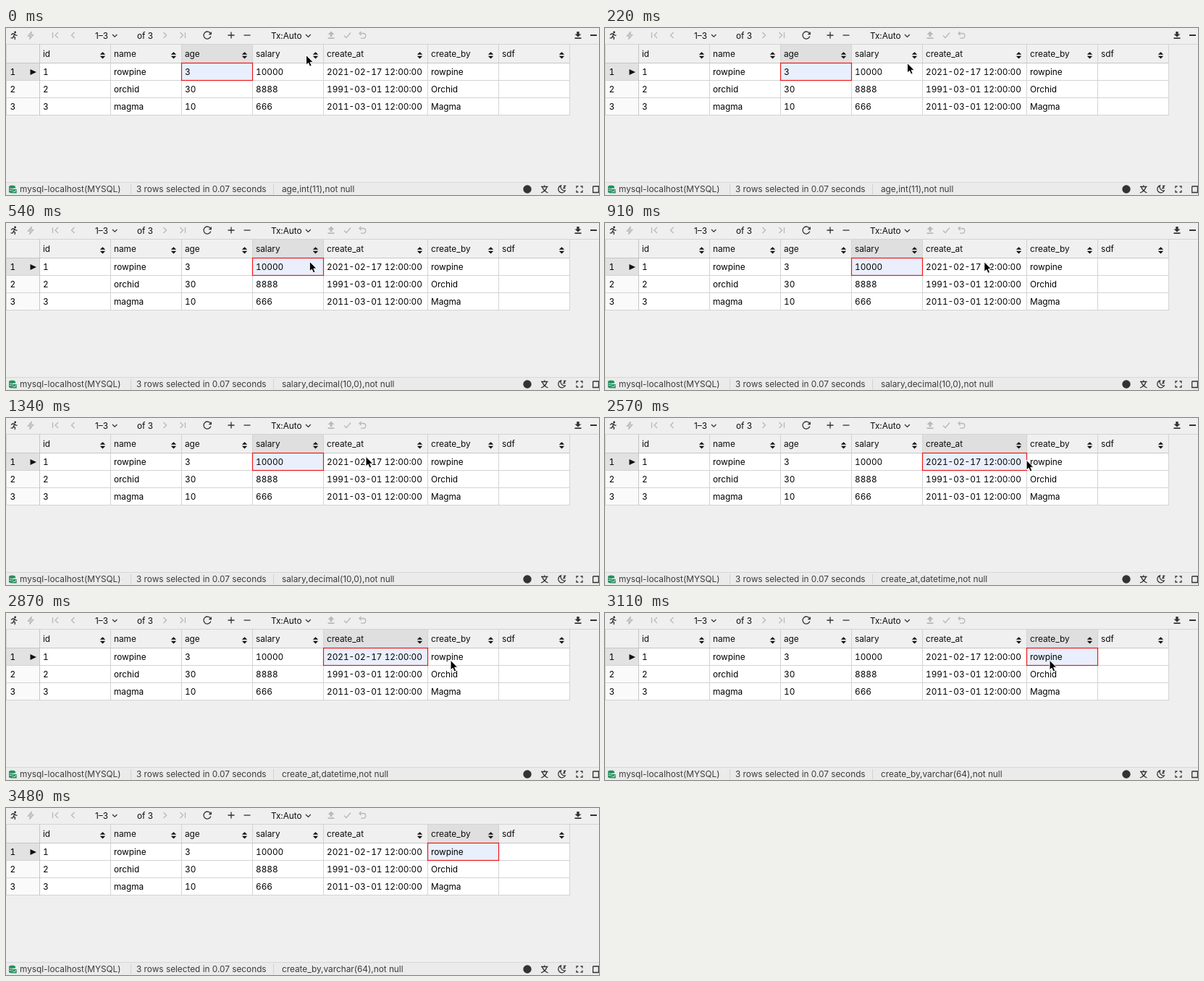
Write an HTML page that moves like this. It is 819 px wide and 231 px high and loops after 4.05 s.

```html
<!DOCTYPE html>
<html lang="en">
<head>
<meta charset="utf-8">
<title>Result grid</title>
<style>
html, body { margin: 0; width: 100%; height: 100%; overflow: hidden; background: #efefef; }
svg { display: block; width: 819px; height: 231px; }
text { font: 11.8px Inter, "Liberation Sans", sans-serif; fill: #0c0c0c; white-space: pre; }
.cells text { fill: #000; font-variant-numeric: tabular-nums; }
.status text { fill: #3a3a3a; }
.line { fill: none; stroke: #333; stroke-width: 1.3; }
.pale { stroke: #b9b9b9; }
</style>
</head>
<body>
<svg id="stage" viewBox="0 0 819 231" xmlns="http://www.w3.org/2000/svg"></svg>
<script>
const LOOP = 4050;
const stage = document.getElementById('stage');

function add(tag, attrs, parent = stage) {
  const node = document.createElementNS('http://www.w3.org/2000/svg', tag);
  for (const key in attrs) node.setAttribute(key, attrs[key]);
  return parent.appendChild(node);
}
const rect = (x, y, width, height, fill, parent) => add('rect', { x, y, width, height, fill }, parent);
const line = (d, pale, parent) => add('path', { d, class: pale ? 'line pale' : 'line' }, parent);
const solid = (d, fill, parent) => add('path', { d, fill }, parent);
function label(x, y, string, parent) {
  const node = add('text', { x, y }, parent);
  node.textContent = string;
  return node;
}

const edges = [46, 144, 242, 340, 438, 582, 680, 778];
const names = ['id', 'name', 'age', 'salary', 'create_at', 'create_by', 'sdf'];
const rows = [
  ['1', 'rowpine', '3', '10000', '2021-02-17 12:00:00', 'rowpine', ''],
  ['2', 'orchid', '30', '8888', '1991-03-01 12:00:00', 'Orchid', ''],
  ['3', 'magma', '10', '666', '2011-03-01 12:00:00', 'Magma', '']
];
const details = {
  2: 'age,int(11),not null',
  3: 'salary,decimal(10,0),not null',
  4: 'create_at,datetime,not null',
  5: 'create_by,varchar(64),not null'
};

function drawToolbar() {
  // running figure and bolt
  add('circle', { cx: 12.6, cy: 5.8, r: 1.4, fill: '#222' });
  line('M7 9.5L9.3 7.8L12 8.3L10.4 11.6L12.6 13.2L12 16M10.4 11.6L9.2 13.8H6.6M12 8.3L13.4 10.2H15.6');
  line('M35.5 5L30.5 11H34L32.5 15.5L37.7 9.3H34.2Z', true);
  // paging
  line('M64.5 6V14M72 6L68 10L72 14', true);
  line('M94.5 6L90.5 10L94.5 14', true);
  label(123, 14.5, '1–3');
  line('M147 9L150.2 12.2L153.4 9');
  label(181, 14.5, 'of 3');
  line('M217.5 6L221.5 10L217.5 14', true);
  line('M240.5 6L244.5 10L240.5 14M247.5 6V14', true);
  // refresh, add, remove
  line('M282.6 8A5 5 0 1 0 282.8 11.5M283.3 5.5V8.6H280.2');
  line('M306.5 10H315.5M311 5.5V14.5');
  line('M328.5 10H337.5');
  label(366, 14.5, 'Tx:Auto');
  line('M414 9L417.4 12.4L420.8 9');
  solid('M449 4.5L453.5 9H450.5V12H447.5V9H444.5ZM444.5 13.3H453.5V15H444.5Z', '#b9b9b9');
  line('M467 10.5L470 13.5L476 6.5', true);
  line('M490.5 5L488 7.5L490.5 10M488 7.5H493.5A3.3 3.3 0 0 1 493.5 14.2H490', true);
  solid('M788.3 5H791.7V8.5H794.5L790 12.5L785.5 8.5H788.3ZM785.5 13.3H794.5V15H785.5Z', '#333');
  rect(807, 9, 9, 2, '#333');
}

function drawStatus() {
  const bar = add('g', { class: 'status' });
  rect(0, 213, 819, 18, '#ebebeb', bar);
  rect(0, 213, 819, 1, '#d8d8d8', bar);
  solid('M4 219.5C4 217.3 13 217.3 13 219.5V222H9V228.4C6.5 228.5 4 227.8 4 226.7Z', '#23905e', bar);
  line('M4.5 221.5C6 222.7 10 222.7 12.5 221.5M4.5 224.4L8.5 225', false, bar).style.cssText = 'stroke:#ebebeb;stroke-width:.8';
  solid('M9.3 223H14.7V228.5H9.3Z', '#23905e', bar);
  line('M10.3 225.7L11.6 227L13.8 224.3', false, bar).style.cssText = 'stroke:#fff;stroke-width:1';
  label(19, 227, 'mysql-localhost(MYSQL)', bar);
  rect(172, 216, 1, 14, '#d2d2d2', bar);
  label(180, 227, '3 rows selected in 0.07 seconds', bar);
  rect(369, 216, 1, 14, '#d2d2d2', bar);
  add('circle', { cx: 720, cy: 223, r: 5.7, fill: '#333' }, bar);
  line('M739 219.5H748.5M743.7 217.5V219.5M740.5 219.5C742 224 745 226.5 748.5 228M747 219.5C746 224 743 226.5 739 228', false, bar);
  line('M766.5 218A5 5 0 1 0 772.3 225A5.2 5.2 0 0 1 766.5 218ZM770 218.5H772.5L770 221.5H772.5', false, bar);
  line('M788 221.5V219H790.5M793.5 219H796V221.5M796 224.5V227H793.5M790.5 227H788V224.5', false, bar);
  line('M810.7 219H819M810.7 219V227.5H819M818.5 219V227.5', false, bar);
  return label(381, 227, '', bar);
}

drawToolbar();
rect(0, 22, 778, 26, '#f0f0f0');
rect(0, 48, 778, 72, '#fff');
rect(1, 72, 45, 48, '#fafafa');
rect(1, 48, 45, 24, '#e2e2e2');
const headFill = rect(0, 23, 0, 25, '#dfdfdf');
const cellFill = rect(0, 48, 0, 24, '#e9effc');

const grid = '#d3d3d3';
rect(0, 22, 819, 1, grid);
for (const y of [48, 72, 96, 120]) rect(0, y, 778, 1, grid);
for (const x of [0, ...edges]) rect(x, 22, 1, 99, grid);
rect(0, 48, 778, 1, '#c6c6c6');
rect(46, 22, 1, 99, '#c6c6c6');

const cells = add('g', { class: 'cells' });
names.forEach((name, i) => {
  const x = edges[i] + 5, mid = edges[i + 1] - 10.5;
  label(x, 39.5, name);
  solid(`M${mid - 3.7} 36.8L${mid} 33.2L${mid + 3.7} 36.8ZM${mid - 3.7} 38.8L${mid} 42.4L${mid + 3.7} 38.8Z`, '#111');
  rows.forEach((row, r) => label(x, 65 + 24 * r, row[i], cells));
});
rows.forEach((row, r) => label(5.5, 65 + 24 * r, String(r + 1), cells));
solid('M33.5 57L42 61L33.5 65Z', '#111');

const focusBox = add('rect', { y: 48.5, height: 24, fill: 'none', stroke: '#2f80e8' });
const pickBox = add('rect', { y: 48.5, height: 24, fill: 'none', stroke: '#f01818', 'stroke-width': 1.2 });
const info = drawStatus();
const pointer = add('path', {
  d: 'M0 0V13.6L3.1 10.9L5.2 15.7L7.7 14.6L5.6 9.9H9.8Z',
  fill: '#000', stroke: '#fff', 'stroke-width': 1, 'stroke-linejoin': 'round'
});

// time, x, y of the pointer tip
const path = [
  [0, 414.5, 37.5], [30, 414.5, 37.5], [180, 417, 47], [360, 419.3, 53.2], [590, 419.3, 53.2],
  [690, 490, 55], [790, 548, 55], [930, 520, 53.5], [1080, 500, 52.5], [1140, 499, 52.5],
  [1290, 498, 53], [1340, 497, 53.3], [1730, 497, 54], [1840, 497, 57], [2440, 497, 57],
  [2500, 537, 57], [2570, 582, 58.3], [2630, 588, 59], [2750, 606, 63], [2870, 614, 65.3], [3400, 614, 65.3]
];
const exit = [[3410, 600, 86], [3434, 662, 145], [3457, 741, 196]];

// the pressed cell gets the fill first; frame, heading and status follow
const focusAt = [[0, 2], [430, 3], [2080, 4], [2990, 5]];
const pickAt = [[0, 2], [540, 3], [2170, 4], [3110, 5]];
const current = (list, t) => list.filter(item => item[0] <= t).pop();

function tip(t) {
  if (t >= exit[0][0]) return current(exit, t).slice(1);
  const next = path.findIndex(p => p[0] > t);
  if (next < 0) return path[path.length - 1].slice(1);
  const a = path[next - 1], b = path[next];
  const k = (t - a[0]) / (b[0] - a[0]);
  return [1, 2].map(i => a[i] + (b[i] - a[i]) * k);
}

function place(node, column, left, trim) {
  node.setAttribute('x', edges[column] + left);
  node.setAttribute('width', edges[column + 1] - edges[column] - trim);
}

function draw(t) {
  const focus = current(focusAt, t)[1], pick = current(pickAt, t)[1];
  place(headFill, pick, 1, 1);
  place(cellFill, focus, 1, 1);
  place(focusBox, focus, 0.5, 1);
  place(pickBox, pick, 0.5, 0);
  focusBox.style.display = focus === pick ? 'none' : '';
  info.textContent = details[pick];
  pointer.style.display = t < 3480 ? '' : 'none';
  pointer.setAttribute('transform', `translate(${tip(t)})`);
}

const start = performance.now();
function tick() {
  draw((performance.now() - start) % LOOP);
  requestAnimationFrame(tick);
}
draw(0);
requestAnimationFrame(tick);
</script>
</body>
</html>
```
